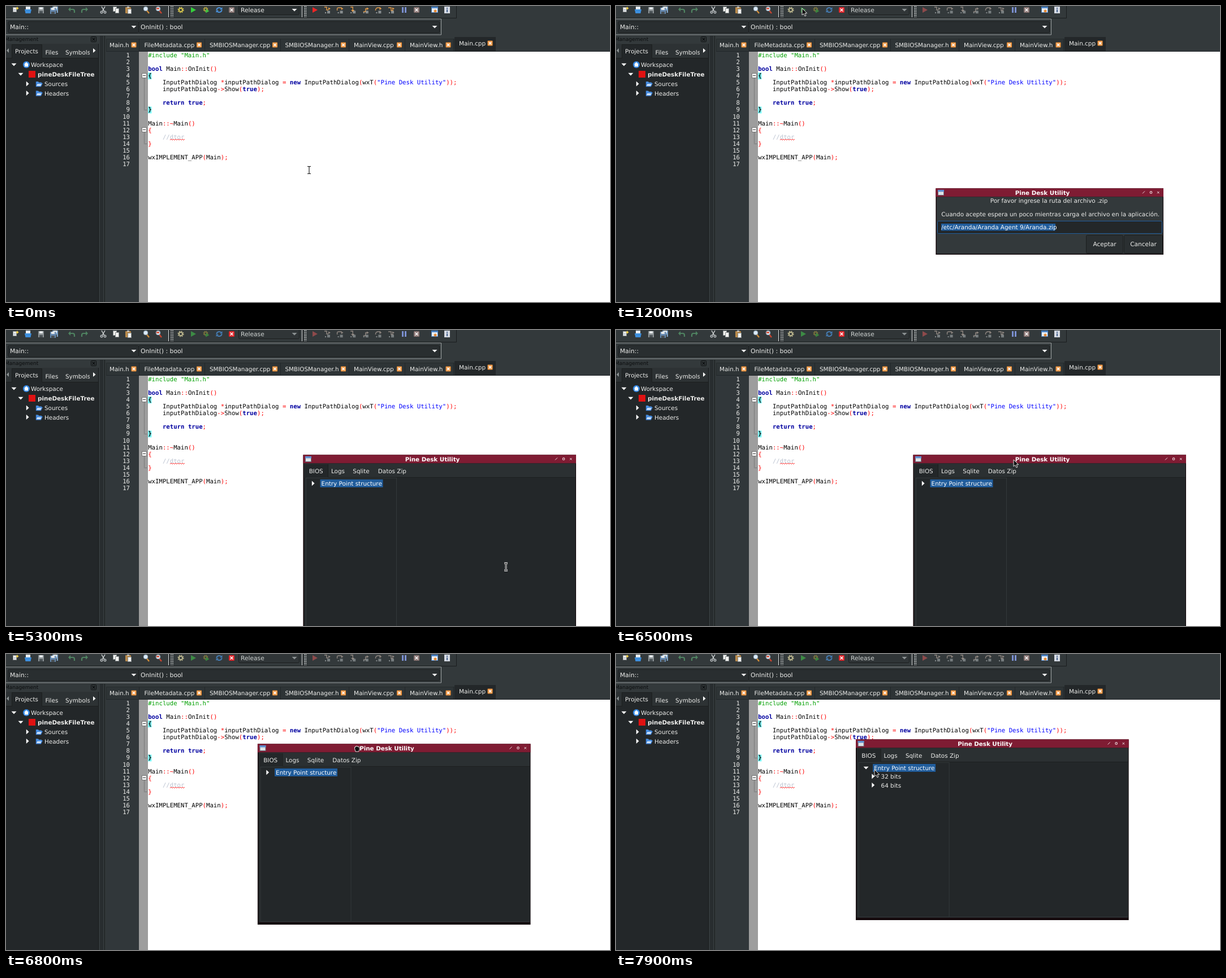
Animation, 1068 px wide and 525 px high, one loop 8 s. Source, as an HTML page:

```html
<!DOCTYPE html>
<html lang="es">
<head>
<meta charset="utf-8">
<title>Editor session</title>
<style>
html, body { margin: 0; width: 100%; height: 100%; overflow: hidden; background: #33393b; }
svg { display: block; width: 1068px; height: 525px; }
svg svg { width: auto; height: auto; }
text { font: 10.4px "DejaVu Sans", sans-serif; fill: #eeeeec; white-space: pre; text-rendering: geometricPrecision; }
.mono { font: 10.68px "DejaVu Sans Mono", monospace; fill: #000; }
.bold { font-weight: bold; }
.mid { text-anchor: middle; }
.end { text-anchor: end; }
.kw { fill: #0000a0; font-weight: bold; }
.str { fill: #00f; }
.op { fill: #f00; }
.pre { fill: #00a000; }
.com { fill: #bcc3d0; }
</style>
</head>
<body>
<svg id="stage" viewBox="0 0 1068 525" xmlns="http://www.w3.org/2000/svg"></svg>
<script>
const BG = '#33393b', BASE = '#232729', EDGE = '#1c1f1f', BLUE = '#215d9c', RED = '#7f1c33';
const APP = 'Pine Desk Utility';

const rect = (x, y, w, h, fill, more = '') =>
  `<rect x="${x}" y="${y}" width="${w}" height="${h}" fill="${fill}" ${more}/>`;
const box = (x, y, w, h, fill, edge, r = 0) =>
  rect(x + .5, y + .5, w - 1, h - 1, fill, `stroke="${edge}" rx="${r}"`);
const path = (d, fill) => `<path d="${d}" fill="${fill}"/>`;
const line = (d, stroke, w = 1, more = '') =>
  `<path d="${d}" fill="none" stroke="${stroke}" stroke-width="${w}" ${more}/>`;
const text = (x, y, s, cls = '', style = '') =>
  `<text x="${x}" y="${y}" class="${cls}" style="${style}" xml:space="preserve">${s}</text>`;
const at = (x, y, s, more = '') => `<g transform="translate(${x} ${y})" ${more}>${s}</g>`;
const cut = (id, w, s) => `<clipPath id="${id}">${rect(0, 0, w, 525, '#000')}</clipPath><g clip-path="url(#${id})">${s}</g>`;
const open = (x, y) => path(`M${x - 4.5} ${y - 2.2}h9l-4.5 4.8z`, '#fff');
const shut = (x, y) => path(`M${x - 2.2} ${y - 4.5}v9l4.8-4.5z`, '#fff');
const down = (x, y, c = '#eee') => path(`M${x - 4.5} ${y - 2}h9l-4.5 4.5z`, c);
const esc = s => s.replace(/&/g, '&amp;').replace(/</g, '&lt;').replace(/>/g, '&gt;');

// ---- toolbar icons, drawn around their centre ----
const gear = c => `<circle r="3.1" fill="none" stroke="${c}" stroke-width="2"/>` +
  `<circle r="4.8" fill="none" stroke="${c}" stroke-width="1.6" stroke-dasharray="1.9 1.87"/>`;
const play = c => path('M-4-5L5 0L-4 5z', c);
const floppy = c => rect(-5, -5, 10, 11, c) + rect(-3, -5, 6, 4, '#e4e8ea') + rect(-3, 2, 6, 4, '#4a5256');
const page = (x, y) => box(x, y, 7, 9, '#f2f2f0', '#8a9092');
const arc = (c, flip) => `<g transform="scale(${flip} 1)">` +
  line('M-3-1h5q3 0 3 3v3', c, 2.2) + path('M-6-1l4-4v8z', c) + '</g>';
const lens = c => line('M1 1L5 6', c, 2.4) + `<circle cx="-1" cy="-2" r="3.8" fill="#dcebf7" stroke="#8fa3b2"/>`;
const cross = c => rect(-5, -5, 10, 10, c, 'rx="1.5"') + line('M-2.5-2.5l5 5m0-5l-5 5', '#fff', 1.5);
const cycle = c => line('M-4.5 0a4.5 4 0 0 1 8-2.5M4.5 0a4.5 4 0 0 1-8 2.5', c, 2) +
  path('M5.5-5v4.5h-4.5zM-5.5 5v-4.5h4.5z', c);
const steps = [
  'M-5-5h4v5h3', 'M-5 1v-3q0-2 3-2h5', 'M-4-5h4v6', 'M-4 3h4v-5h4', 'M-5 1q0-5 5-5h4', 'M-5-4h5v5h4'
];
const step = (i, c) => line(steps[i], c, 1.4) + path(i == 2 ? 'M-3 0h6l-3 4z' : 'M2-4.5v4.5l4-2.2z', c) +
  line('M0 5h5M0 2.500h5M-4 5h2', '#b9bfc1', 1.4);

function icons(run) {
  const put = (x, s, o = 1) => at(x, 7, s, `opacity="${o}"`);
  const dim = run ? .55 : 1;
  return [
    put(17, page(-5, -5) + line('M-3-1h3M-3 1h3', '#9ab') + path('M3-6l1 2 2 1-2 1-1 2-1-2-2-1 2-1z', '#ffd94a')),
    put(39, rect(-4, -6, 8, 6, '#e8eef4') + path('M-6-1h12l-1.5 7h-9z', '#3d8fdd')),
    put(62, floppy('#8c9396')),
    put(85, at(2, -1, floppy('#7fa4c9')) + at(-2, 1, floppy('#6689b0'))),
    put(116, arc('#4f8361', 1)), put(139, arc('#4f8361', -1)),
    put(172, line('M-3-6L2 3M3-6L-2 3', '#d3d7d8', 1.4) +
      '<g fill="none" stroke="#b9bec0" stroke-width="1.4"><circle cx="-3" cy="4" r="1.8"/><circle cx="3" cy="4" r="1.8"/></g>'),
    put(194, page(-5, -6) + page(-1, -3)),
    put(216, rect(-5, -5, 10, 11, '#b98a4b', 'rx="1"') + rect(-2, -6, 4, 2, '#ccc') + page(-1, -2)),
    put(248, lens('#d08b36')), put(270, lens('#c9452f') + rect(-4, -4, 5, 3, '#d9604a')),
    put(309, gear(run ? '#b9b48c' : '#d3c24c')),
    put(331, play(run ? '#3d8c45' : '#36d03c')),
    put(354, at(-1, -1, `<g transform="scale(.8)">${gear('#b8a840')}</g>`) +
      at(2, 2, `<g transform="scale(.7)">${play('#3ec543')}</g>`), dim),
    put(377, cycle('#4a90d8'), run ? .75 : 1),
    put(399, cross(run ? '#e0262b' : '#8b7674')),
    put(546, play(run ? '#8d4a4b' : '#ee2626')),
    steps.map((_, i) => put(568 + i * 22.6, step(i, run ? '#a69a92' : '#e39a48'), run ? .8 : 1)).join(''),
    put(704, rect(-4, -5, 3, 10, '#7b8fd0') + rect(1, -5, 3, 10, '#7b8fd0')),
    put(726, cross('#8b7674')),
    put(758, box(-6, -6, 12, 11, '#e9eef4', '#4a82c4') + rect(-6, -6, 12, 3, '#4a82c4') +
      '<circle cx="1" cy="2" r="2.5" fill="#e58a36"/>'),
    put(780, rect(-5, -6, 10, 12, '#d4d9e2') + rect(-1, -4, 2, 2, '#47628f') + rect(-1, -1, 2, 5, '#47628f')),
    box(411, -6, 108, 22, run ? '#303537' : '#2a2f31', EDGE, 2),
    text(415, 11, 'Release', '', `font-size:10.7px;fill:${run ? '#d0d4d3' : '#eeeeec'}`),
    down(510, 7, run ? '#8b9192' : '#eee')
  ].join('');
}

function bars() {
  const grip = x => line(`M${x} 0V20`, '#e6e8e8', 1.4, 'stroke-dasharray="1.6 1.6"');
  const combo = (x, w, s) => box(x, 27, w, 21, '#292e30', EDGE, 2) +
    text(x + 4, 41, s, '', 'font-size:10.8px') + down(x + w - 9, 37);
  return rect(0, 0, 1068, 525, BG) +
    line('M0 21.5H796.5V0', '#1a1d1e') + line('M0 23H769.5V51H0', '#a9adae', .9) +
    line('M287.5 0V20M523.5 0V20', '#dfe2e2') + line('M289 0V20M525 0V20', '#1a1d1e') +
    grip(292) + grip(295) + grip(528) + grip(530.5) +
    combo(3, 232, 'Main::') + combo(234, 533, 'OnInit() : bool');
}

function sidebar() {
  const folder = y => at(58, y, path('M-5-4h4l1 1.5h5v2h-10z', '#4b93e6') +
    path('M-3-.5h9l-2.5 5h-8.5z', '#cfe4fb') + line('M-4.5-4v8.5h8l2.5-5h-9l-1.8 4', '#3f83d8', 1.3));
  return text(-2, 62, 'Management', '', 'font-size:9px;fill:#0c0e0f') +
    box(150, 54, 10, 10, BG, '#0c0e0f', 1) + line('M152.5 56.5l5 5m0-5l-5 5', '#0c0e0f', 1.5) +
    rect(0, 67, 163, 26, '#2d3234') + rect(10, 68, 53, 25, BASE) + line('M10.5 93V68.5H63.5V93', EDGE) +
    line('M64 92.5H163M0 92.5H10', EDGE) +
    rect(0, 93, 163, 432, BASE) +
    path('M5 75v8l-4-4z', '#8d9394') + path('M154 75v8l4.5-4z', '#fff') +
    text(16, 84, 'Projects') + text(69.5, 86, 'Files') + cut('tabCut', 148, text(105, 86, 'Symbols')) +
    open(14, 104) + '<circle cx="36" cy="104" r="6" fill="#3689e6"/>' +
    path('M36 99.5l4 4h-1v4h-6v-4h-1z', '#fff') + text(44, 108, 'Workspace') +
    open(26, 121) + rect(40, 115, 12, 12, '#e01212') + cut('treeCut', 158, text(56, 125, 'pineDeskFileTree', 'bold')) +
    shut(38, 138) + folder(138) + text(68, 142, 'Sources') +
    shut(38, 154.5) + folder(154.5) + text(68, 158.5, 'Headers') +
    rect(163, 52, 14, 473, BG) + line('M163.5 67V525M174.5 53V525', '#181b1c') + rect(166, 53, 6, 472, '#282d2f');
}

// ---- code ----
const LH = 12.06, code = `#include "Main.h"

bool Main::OnInit()
{
    InputPathDialog *inputPathDialog = new InputPathDialog(wxT("${APP}"));
    inputPathDialog->Show(true);

    return true;
}

Main::~Main()
{
    //dtor
}

wxIMPLEMENT_APP(Main);
`.split('\n');
const token = /(^#.*)|(\/\/.*)|("[^"]*")|\b(bool|new|return|true)\b|([^\w\s"]+)|([\w\s])/g;
const kinds = ['pre', 'com', 'str', 'kw', 'op'];
const paint = s => s.replace(token, (m, ...g) => {
  const k = kinds[g.slice(0, 5).findIndex(Boolean)];
  return k ? `<tspan class="${k}">${esc(m)}</tspan>` : m;
});

function editor() {
  const tabs = [['Main.h', 183, 226, 235], ['FileMetadata.cpp', 244.5, 341.5, 351], ['SMBIOSManager.cpp', 360, 475.5, 485],
    ['SMBIOSManager.h', 493.5, 596.5, 606], ['MainView.cpp', 615, 695.5, 705], ['MainView.h', 714, 782, 791]];
  const close = (x, y) => at(x, y, rect(-4.5, -4.5, 9, 9, '#f0953f', 'rx="1"') + line('M-2.2-2.2l4.4 4.4m0-4.4l-4.4 4.4', '#fff', 1.6));
  let s = rect(177, 58, 616, 22, '#2e3436') + line('M177.5 80V58.5H793', '#272c2d');
  for (const [name, x, c, e] of tabs)
    s += text(x, 73, name) + close(c, 69) + line(`M${e + .5} 58V80`, '#22272a');
  s += rect(793, 55, 73, 26, BASE) + text(801, 70, 'Main.cpp') + close(856, 66);
  s += line('M177 80.5H1068', '#22272a') + rect(177, 81, 58, 444, '#31373a') + rect(235, 81, 16, 444, '#9d9d9d') + rect(251, 81, 817, 444, '#fff');
  code.forEach((row, i) => {
    const y = 91 + i * LH;
    s += text(219, y, i + 1, 'mono end', 'fill:#eeeeec');
    if (i == 3 || i == 8) s += rect(251, y - 9, 6.5, 12, '#80ffff') + text(251.2, y, row, 'mono bold');
    else s += text(251.2, y, paint(row), 'mono');
  });
  const fold = (a, b) => line(`M244.5 ${a + 5}V${b}H250`, '#555', 1, 'stroke-dasharray="1 1"') +
    box(240, a - 4, 9, 9, '#fff', '#777') + line(`M242 ${a + .5}h5`, '#333');
  let wave = 'M290 238';
  for (let i = 0; i < 13; i++) wave += `l2 ${i % 2 ? 2 : -2}`;
  return s + fold(123, 184.5) + fold(219, 244.5) + line(wave, '#f00', .8);
}

// ---- windows ----
function frame(w, h) {
  const r = w - 35;
  return rect(-.6, .4, w + .6, h - .4, '#14090c') + rect(-.6, .4, w + .6, 15.1, RED) +
    box(3, 3, 11, 10, '#dfe3e6', '#6b7480') + rect(3, 3, 11, 3.5, '#5f8fd0') +
    text(w / 2 - 13, 11.8, APP, 'bold mid', 'font-size:10.3px;fill:#fff') +
    line(`M${r - 2} 9.5l4-4M${r + 24} 6l3.500 3.5m0-3.5l-3.500 3.5`, '#ecd9dd') +
    `<circle cx="${r + 13}" cy="7.7" r="1.8" fill="none" stroke="#ecd9dd" stroke-width="1.1"/>`;
}

function dialog() {
  const button = (x, w, s) => box(x, 83, w, 33, '#2a2f31', EDGE, 2) + text(x + w / 2, 103, s, 'mid', 'font-size:10.6px');
  return frame(402, 118) + rect(1, 15.5, 400, 101, BG) +
    text(199.5, 26, 'Por favor ingrese la ruta del archivo .zip', 'mid') +
    text(9.3, 50, 'Cuando acepte espera un poco mientras carga el archivo en la aplicación.') +
    box(2, 58, 398, 23, BASE, EDGE, 2) + `<g id="focus">${box(2, 58, 398, 23, 'none', BLUE, 2)}</g>` +
    rect(9, 63, 202, 12.5, BLUE) + text(9.3, 73, '/etc/Aranda/Aranda Agent 9/Aranda.zip', '', 'fill:#fff') +
    button(265, 66, 'Aceptar') + button(332, 69, 'Cancelar');
}

function viewer() {
  return frame(482, 321) + rect(1, 15.5, 480, 301, '#2b3032') +
    rect(1, 41, 480, 275, BASE) + rect(2, 17, 41, 25, BASE) +
    line('M43.5 17V40.5H481', EDGE) +
    text(9.7, 32.5, 'BIOS') + text(49, 33, 'Logs') + text(87.3, 33, 'Sqlite') + text(131.8, 33, 'Datos Zip') +
    box(4, 41, 161, 275, BASE, '#33393b') + line('M165 315.5H480', '#33393b') +
    rect(29.5, 44, 111, 14, BLUE) + text(31.6, 54.8, 'Entry Point structure', '', 'fill:#fff') +
    `<g id="closed">${shut(17, 51)}</g><g id="opened">` +
    open(17.5, 51) + shut(30, 66) + text(44, 70, '32 bits') + shut(30, 81.5) + text(44, 85.5, '64 bits') + '</g>';
}

const BEAM = 'M-3-6.5h2.2l.8 1 .8-1h2.2M0-5.5v11M-3 6.5h2.2l.8-1 .8 1h2.2';
const pen = 'fill="#111" stroke="#f4f4f4" stroke-width=".9"';
const cursors = {
  arrow: `<path d="M0 0V12L2.8 9.6L5 14L7 13L5 8.8H8.8z" ${pen}/>`,
  beam: line(BEAM, '#fff', 2.8) + line(BEAM, '#111', 1.1),
  grab: `<path d="M-4.5 1v-3h2v-1.5h2.5v.7h2.2v.8h1.8v4.500l-1.500 3.500h-5.500z" ${pen}/>`
};

const group = (id, s) => `<g id="${id}">${s}</g>`;
document.getElementById('stage').innerHTML = bars() + group('idle', icons(false)) + group('busy', icons(true)) +
  sidebar() + editor() + group('dialog', at(566, 323, dialog())) + group('viewer', viewer()) +
  Object.entries(cursors).map(([k, s]) => group(k, s)).join('');
const $ = id => document.getElementById(id);

// ---- motion: time, x, y, pointer ----
const pointer = [
  [0, 536, 291, 'beam'], [100, 470, 215, 'beam'], [200, 350, 108, 'beam'], [300, 245, 14, 'arrow'],
  [400, 258, 4, 'arrow'], [500, 258, 4, 'arrow'], [900, 325, 4, 'arrow'], [1200, 329, 4, 'arrow'],
  [1400, 329, 4, 'arrow'], [1500, 348, 34, 'arrow'], [1600, 430, 110, 'beam'], [1900, 735, 315, 'beam'],
  [2000, 805, 365, 'arrow'], [2300, 883, 419, 'arrow'], [5200, 883, 419, 'arrow'], [5300, 884, 420, 'beam'],
  [5400, 872, 400, 'arrow'], [5900, 718, 240, 'arrow'], [6000, 698, 217, 'beam'], [6100, 690, 212, 'beam'],
  [6200, 691, 213, 'beam'], [6300, 695, 222, 'arrow'], [6500, 703, 230, 'arrow'], [6600, 703, 230, 'arrow'],
  [6700, 673, 206, 'grab'], [6800, 621, 167, 'grab'], [6900, 604, 161, 'grab'], [7000, 602, 160, 'grab'],
  [7100, 580, 165, 'arrow'], [7500, 442, 198, 'arrow'], [7600, 442, 199, 'arrow'], [7900, 457, 205, 'arrow']
];
const place = [[0, 526, 221], [6600, 526, 221], [6700, 496, 197], [6800, 445.5, 159], [6900, 426.5, 152], [7000, 424.6, 151]];

function sample(table, t) {
  const i = table.findLastIndex(k => k[0] <= t), a = table[i], b = table[i + 1] || a;
  const f = a === b ? 0 : (t - a[0]) / (b[0] - a[0]);
  return [a[1] + (b[1] - a[1]) * f, a[2] + (b[2] - a[2]) * f, a[3]];
}
const show = (id, on) => $(id).style.display = on ? '' : 'none';
const move = (id, x, y) => $(id).setAttribute('transform', `translate(${x} ${y})`);

function draw(ms) {
  const t = Math.floor(ms / 100) * 100;
  show('idle', t < 1000);
  show('busy', t >= 1000);
  show('dialog', t >= 1100 && t < 5300);
  show('focus', t < 2300);
  show('viewer', t >= 5300);
  show('closed', t < 7700);
  show('opened', t >= 7700);
  move('viewer', ...sample(place, t).slice(0, 2));
  const [x, y, kind] = sample(pointer, t);
  for (const k in cursors) show(k, k === kind);
  move(kind, x, y);
}

const start = performance.now();
function tick() {
  draw((performance.now() - start) % 8000);
  requestAnimationFrame(tick);
}
tick();
</script>
</body>
</html>
```
